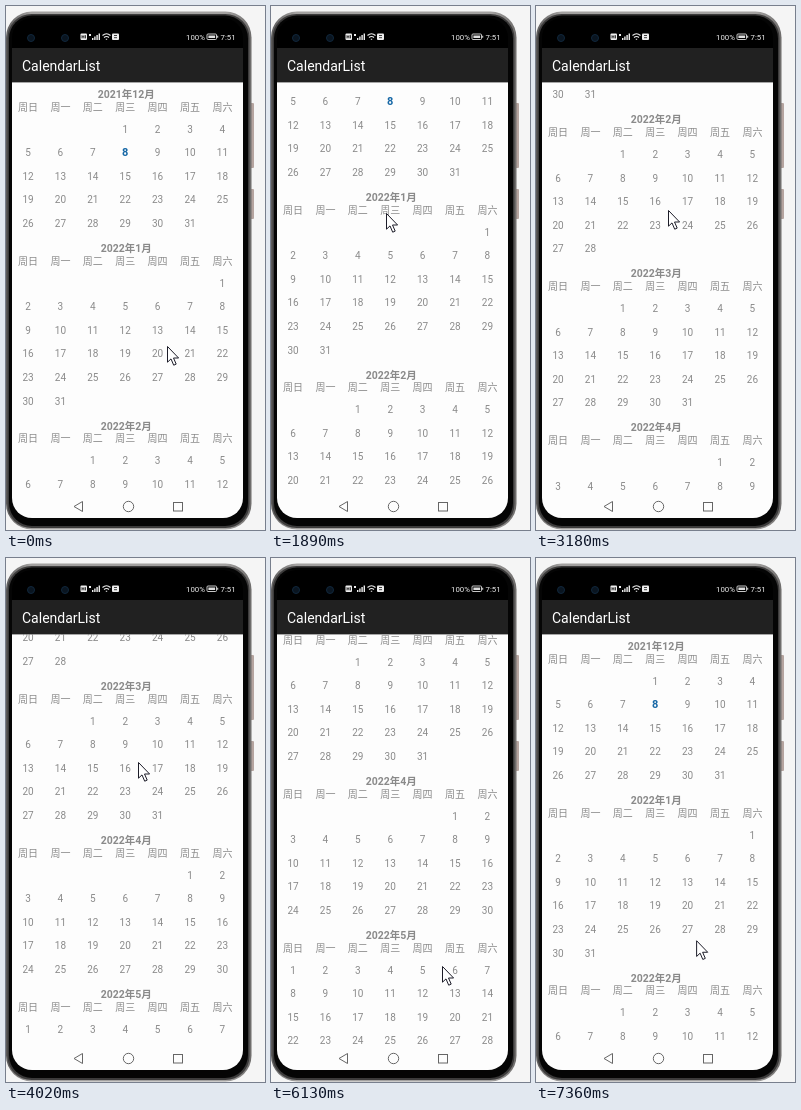
Recreate the animation shown at these times as an HTML page. Size 259 by 524 pixels, loop 8000 ms.

```html
<!DOCTYPE html>
<html lang="zh-CN">
<head>
<meta charset="utf-8">
<title>Calendar</title>
<style>
html, body { margin: 0; width: 100%; height: 100%; overflow: hidden; background: #f5f5f5; }
svg { display: block; width: 259px; height: 524px; font-family: Roboto, "Noto Sans CJK SC", "Noto Sans CJK", sans-serif; }
#list { text-anchor: middle; fill: #8a8a8a; font-size: 10px; }
#list .month { font-size: 10.5px; font-weight: 700; }
#list .week { font-weight: 500; }
#list .today { font-weight: 700; fill: #1768a6; font-size: 11px; }
.status { fill: #eee; font-size: 7.8px; }
.nav { fill: none; stroke: #666; stroke-width: 1; }
</style>
</head>
<body>
<svg viewBox="0 0 259 524">
  <defs>
    <linearGradient id="metal" x2="1" y2="0">
      <stop offset="0" stop-color="#5c5b5b"/>
      <stop offset=".1" stop-color="#a3a1a0"/>
      <stop offset=".9" stop-color="#a3a1a0"/>
      <stop offset="1" stop-color="#6d6b6a"/>
    </linearGradient>
    <clipPath id="screen"><rect x="6" y="12" width="231" height="500" rx="20"/></clipPath>
    <clipPath id="view"><rect x="6" y="76" width="231" height="412"/></clipPath>
  </defs>

  <rect x="244" y="97" width="4" height="65" rx="1" fill="#b5a49f"/>
  <rect x="244" y="183" width="4" height="30" rx="1" fill="#b5a49f"/>
  <rect x="0" y="5.5" width="245.5" height="518" rx="26" fill="url(#metal)"/>
  <rect x="1.5" y="8" width="242" height="514" rx="24" fill="#3c3b3b"/>
  <rect x="3" y="9.5" width="239" height="510.5" rx="23" fill="#050505"/>

  <g clip-path="url(#screen)">
    <rect x="6" y="12" width="231" height="30" fill="#000"/>
    <rect x="6" y="42" width="231" height="35" fill="#212121"/>
    <rect x="6" y="76.4" width="231" height="436" fill="#fdfdfd"/>
  </g>

  <g fill="#0a1520" stroke="#10273c">
    <circle cx="25" cy="32" r="3.5"/>
    <circle cx="59" cy="32" r="3.5"/>
  </g>
  <g fill="#eee">
    <rect x="74.5" y="27.5" width="6.5" height="6.5" rx="1"/>
    <rect x="106" y="27.5" width="7" height="6.5" rx="1"/>
    <path d="M83 28h2v2h-2zM86 32h1.4v2H86zM88.2 30.5h1.4V34h-1.4zM90.4 29h1.4v5h-1.4zM92.6 27.5H94V34h-1.4z"/>
    <path d="M76 29.2v3.2M78 29.2v3.2M76 30.8h2M79.5 29.2v3.2M108 29.5h3M108 31.7h3" stroke="#111" stroke-width=".8"/>
  </g>
  <path d="M96.5 29.5q4-3.6 8 0M98 31.5q2.5-2 5 0M99.8 33.3h1.4" fill="none" stroke="#eee" stroke-width="1.1"/>
  <text class="status" x="180" y="33.7">100%</text>
  <rect x="201" y="28" width="9.5" height="5.5" rx="1" fill="none" stroke="#ddd" stroke-width=".9"/>
  <path d="M202.4 29.4h6.7v2.7h-6.7zM211.2 29.7h1v2h-1z" fill="#ddd"/>
  <text class="status" x="214.5" y="33.7">7:51</text>
  <text x="16" y="65" fill="#fff" font-size="14">CalendarList</text>

  <g clip-path="url(#view)"><g id="list"></g></g>

  <path class="nav" d="M76.5 495.5v10l-8.5-5z"/>
  <circle class="nav" cx="122.5" cy="500.5" r="5.2"/>
  <rect class="nav" x="167.5" y="496.5" width="9" height="8.5"/>

  <path id="cursor" d="M.5.5V16.2L4 12.9L6.7 19.2L9.2 18.1L6.5 12H11.6Z" fill="#fff" stroke="#1c1c28" stroke-width="1" stroke-linejoin="round"/>
</svg>
<script>
(() => {
  const list = document.getElementById('list');
  const cursor = document.getElementById('cursor');
  const ROW = 23.6;
  const colX = c => 22 + c * 32.4;

  function label(text, x, y, cls) {
    const el = document.createElementNS('http://www.w3.org/2000/svg', 'text');
    el.setAttribute('x', x);
    el.setAttribute('y', y + 3.7);
    if (cls) el.setAttribute('class', cls);
    el.textContent = text;
    list.appendChild(el);
  }

  // Adds one month with its title centred on y; returns the next title's y.
  function addMonth(year, month, y) {
    const first = new Date(year, month, 1).getDay();
    const days = new Date(year, month + 1, 0).getDate();
    label(`${year}年${month + 1}月`, 120.3, y, 'month');
    [...'日一二三四五六'].forEach((d, c) => label('周' + d, colX(c), y + 12.7, 'week'));
    for (let d = 1; d <= days; d++) {
      const cell = first + d - 1;
      const today = year === 2021 && d === 8;
      label(d, colX(cell % 7), y + 34.7 + Math.floor(cell / 7) * ROW, today && 'today');
    }
    return y + 36 + Math.ceil((first + days) / 7) * ROW;
  }

  let titleY = 88.2;
  for (let m = 11; m < 18; m++) titleY = addMonth(2021 + Math.floor(m / 12), m % 12, titleY);

  const linear = p => p;
  const easeIn = p => p * p;
  const easeOut = p => p * (2 - p);
  const easeInOut = p => p * p * (3 - 2 * p);

  // Each glide: start, end, distance, easing
  const glides = [
    [1640, 1890, 51, easeIn],
    [1890, 3090, 255.3, easeOut],
    [3618, 4310, 173.7, easeOut],
    [4410, 5106, 24.6, easeOut],
    [6114, 7150, -504.6, easeInOut]
  ];

  // Each move: start, end, dx, dy
  const moves = [
    [702, 890, -3, 38],
    [1240, 1494, -44, -180],
    [1494, 1890, 1, 9],
    [1890, 2300, 17, -3],
    [4300, 4662, -6, -62],
    [4662, 5000, -9, -18],
    [5580, 6114, 54, 284],
    [6114, 7314, -11, -26]
  ];

  const progress = (t, [start, end]) => Math.min(1, Math.max(0, (t - start) / (end - start)));
  const total = (parts, t, i, ease) => parts.reduce(
    (sum, part) => sum + part[i] * (ease || part[3])(progress(t, part)), 0);

  const STEP = 132, PHASE = 42;

  function draw(now) {
    const t = Math.floor((now % 8000 - PHASE) / STEP) * STEP + PHASE;
    const x = 161 + total(moves, t, 2, linear);
    const y = 340 + total(moves, t, 3, linear);
    list.setAttribute('transform', `translate(0 ${-total(glides, t, 2)})`);
    cursor.setAttribute('transform', `translate(${x} ${y})`);
    requestAnimationFrame(draw);
  }
  draw(performance.now());
})();
</script>
</body>
</html>
```
